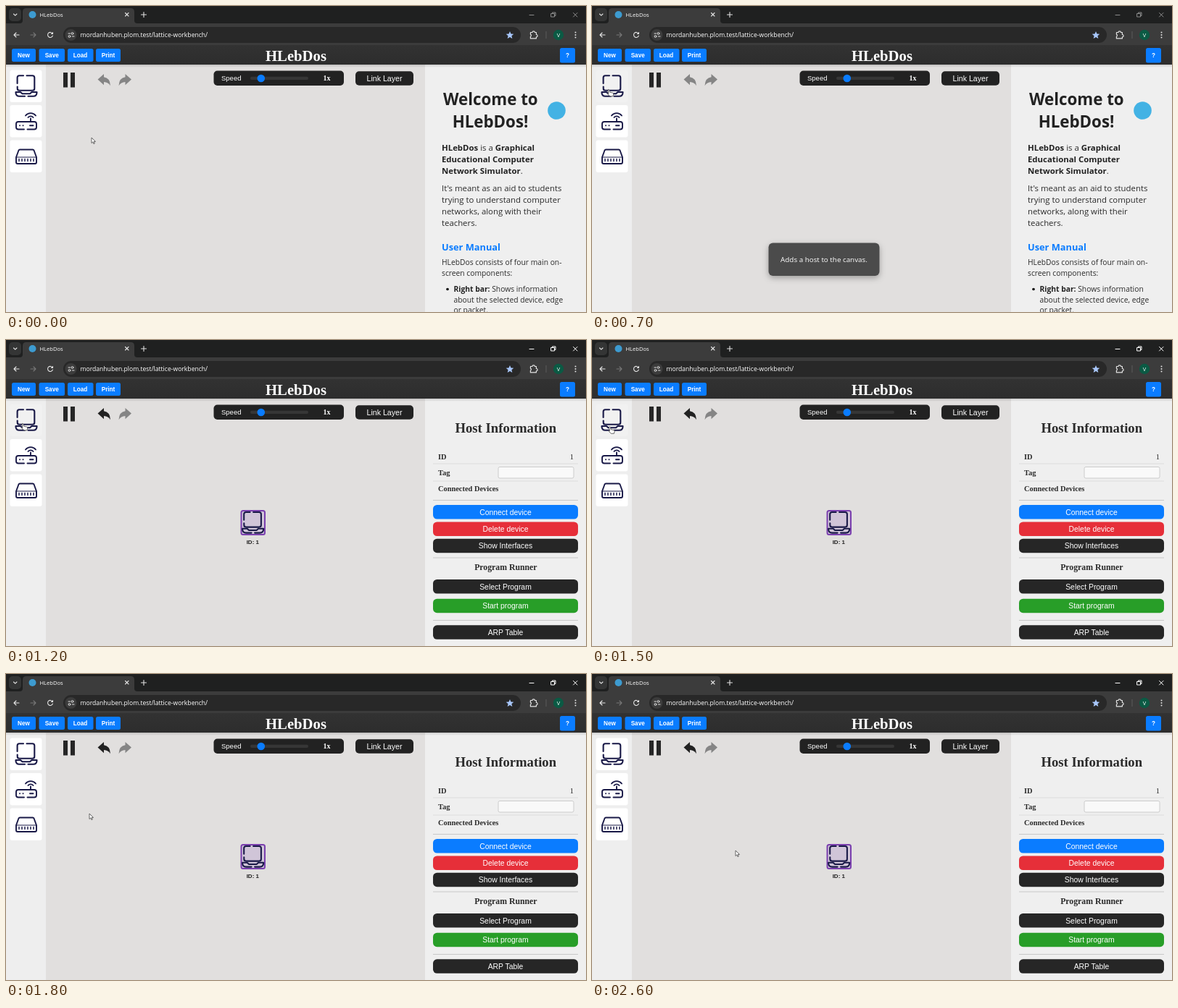
Animation of 800 by 423 pixels, one loop 2700 ms. Source, as an HTML page:

```html
<!DOCTYPE html>
<html lang="en">
<head>
<meta charset="utf-8">
<title>Network classroom</title>
<style>
html, body { margin: 0; width: 100%; height: 100%; overflow: hidden; background: #e1dfde; }
svg { display: block; width: 800px; height: 423px; }
text { font-family: "Open Sans", "Noto Sans", sans-serif; fill: #2b2b2b; }
.arial text, text.arial { font-family: "Liberation Sans", Arial, sans-serif; }
.serif text { font-family: "Liberation Serif", "Times New Roman", serif; font-weight: bold; }
.mid, .mid text { text-anchor: middle; }
text.white, .white text { fill: #fff; }
.b { font-weight: bold; fill: #222; }
.line { fill: none; stroke-linecap: round; stroke-linejoin: round; }
.blue { fill: #0a7cff; }
.dark { fill: #262626; }
</style>
</head>
<body>
<svg viewBox="0 0 800 423">
<defs>
  <linearGradient id="bar" x2="0" y2="1"><stop stop-color="#323232"/><stop offset="1" stop-color="#2d2d2d"/></linearGradient>
  <linearGradient id="fade" x2="0" y2="1"><stop stop-opacity=".14"/><stop offset="1" stop-opacity="0"/></linearGradient>
  <filter id="soft" x="-20%" y="-40%" width="140%" height="200%"><feDropShadow dx="0" dy="3" stdDeviation="4" flood-opacity=".3"/></filter>
  <g id="laptop" class="line" stroke="#191947" stroke-width="2.1">
    <path d="M15.600 107V99q0-2.800 2.800-2.800H24M28.500 96.200h8q2.800 0 2.800 2.800v15q0 2.800-2.800 2.800h-18q-2.800 0-2.800-2.800v-2.500"/>
    <path d="M26 124.800h-7.500q-5 0-5-5v-.800H20l2.500 2.200h10.500l2.500-2.200h7v.800q0 5-5 5h-7"/>
  </g>
  <path id="bend" d="M126.500 101.500L135 94v4.300q8.500 1 9 12q-3-5-9-5.300v4.300z"/>
</defs>

<!-- browser frame -->
<rect width="800" height="26" fill="#1f2020"/>
<rect y="24" width="800" height="30" fill="#3c3c3c"/>
<path d="M19 24q4 0 4-4V8q0-5 5-5h144q5 0 5 5v12q0 4 4 4z" fill="#3c3c3c"/>
<rect x="4" y="3" width="17" height="18" rx="5" fill="#343535"/>
<circle cx="36.500" cy="12" r="5" fill="#3d9bd0"/>
<text class="white" x="46.500" y="15" font-size="7.600">HLebDos</text>
<g class="line" stroke="#e3e3e3" stroke-width="1.100">
  <path d="M10.500 11l2.200 2.200l2.200-2.200M164.500 9.500l4.500 4.500m0-4.500l-4.500 4.500M186.500 12h7m-3.500-3.500v7"/>
  <path d="M18 40h-7m3-3l-3 3l3 3M64 38a3.500 3.500 0 1 0 .400 3M64.500 36.500v2h-2"/>
  <path d="M34 40h7m-3-3l3 3l-3 3" stroke="#777"/>
</g>
<rect x="79" y="29" width="631" height="22" rx="11" fill="#282828"/>
<circle cx="89.500" cy="40" r="8" fill="#3c3c3c"/>
<g class="line" stroke="#e3e3e3">
  <path d="M86 38h2.500M91.500 42H94"/>
  <circle cx="91.500" cy="38" r="1.400"/><circle cx="87.500" cy="42" r="1.400"/>
  <path d="M723.500 36.500h2.500a1.700 1.700 0 0 1 3.400 0h2v3a1.700 1.700 0 0 1 0 3.400v2h-8v-2.500q2-1.700 0-3.400z" stroke-width="1.200"/>
</g>
<text class="white" x="102.500" y="43" font-size="8.600">mordanhuben.plom.test/lattice-workbench/</text>
<path d="M695 35l1.500 3.500l3.800.300l-2.900 2.500l.900 3.700l-3.300-2l-3.300 2l.900-3.700l-2.900-2.500l3.800-.300z" fill="#a8c7fa"/>
<path d="M745 35v10" stroke="#5b5b5b"/>
<circle cx="762" cy="40" r="7.200" fill="#0b5a44"/>
<text class="white mid" x="762" y="42.800" font-size="7.500">V</text>
<g fill="#e3e3e3"><circle cx="785.500" cy="36.500" r="1"/><circle cx="785.500" cy="40" r="1"/><circle cx="785.500" cy="43.500" r="1"/></g>
<path id="controls" class="line" d="M722 12.500h6M752 10.500h4.500v4.500H752zM753.500 10.500V9h4.500v4.500h-1.500M782.500 9.500l5.500 5.500m0-5.500l-5.500 5.500"/>

<!-- page -->
<rect y="81" width="55" height="342" fill="#eee"/>
<rect x="578" y="81" width="222" height="342" fill="#efefef"/>
<rect y="81" width="800" height="4" fill="url(#fade)"/>
<rect y="54" width="800" height="27" fill="url(#bar)"/>
<g class="serif"><text class="white mid" x="400" y="75.500" font-size="20.700">HLebDos</text></g>
<g class="arial mid white" font-size="8.200" font-weight="bold">
  <g class="blue">
    <rect x="8" y="59" width="33" height="18" rx="2.500"/><rect x="45.500" y="59" width="35.500" height="18" rx="2.500"/>
    <rect x="85" y="59" width="35.500" height="18" rx="2.500"/><rect x="124" y="59" width="34" height="18" rx="2.500"/>
    <rect x="764" y="58" width="21" height="20.500" rx="2.500"/>
  </g>
  <text x="24.500" y="71">New</text><text x="63.200" y="71">Save</text>
  <text x="102.500" y="71">Load</text><text x="141" y="71">Print</text>
  <text x="774.500" y="71.300">?</text>
</g>

<!-- device palette -->
<g fill="#fff">
  <rect id="card" x="5.500" y="88.500" width="44" height="44.500" rx="3"/>
  <rect x="5.500" y="137" width="44" height="44.500" rx="3"/>
  <rect x="5.500" y="185.500" width="44" height="44.500" rx="3"/>
</g>
<use href="#laptop"/>
<g class="line" stroke="#191947" stroke-width="1.900">
  <path d="M25 170.500h-8q-3 0-3-3V163q0-3 3-3h22q3 0 3 3v4.500q0 3-3 3h-9.500M34 155.500v4M19 165.300h.100M23.500 165.300h.100M33 165.300h4.500"/>
  <path d="M30.500 154a4.600 4.600 0 0 1 7 0M27 151.500a9 9 0 0 1 14 0"/>
  <path d="M14 209l3.500-9.500q.500-1 1.500-1h18q1 0 1.500 1L42 209v7q0 2-2 2H16q-2 0-2-2z"/>
  <path d="M14.500 209h27" stroke-width="1.200"/>
  <path d="M18 211.500v3m4-3v3m4-3v3m4-3v3m4-3v3m4-3v3" stroke-width="1.500"/>
</g>

<!-- canvas controls -->
<path d="M79 92h6v20.500h-6zM89 92h6v20.500h-6z" class="dark"/>
<use id="undo" href="#bend"/>
<use href="#bend" transform="matrix(-1 0 0 1 299.500 0)" fill="#858585"/>
<rect x="286.500" y="89.500" width="179.500" height="20.500" rx="5" fill="#222"/>
<rect x="482" y="90.300" width="80" height="19.500" rx="5" fill="#222"/>
<rect x="337" y="97.800" width="80" height="4.200" rx="2" fill="#363636"/>
<circle cx="351.800" cy="100" r="5.300" class="blue"/>
<g class="arial white">
  <text x="297" y="103" font-size="9.500">Speed</text>
  <text x="522" y="103.800" font-size="10.600" class="mid">Link Layer</text>
</g>
<g class="serif"><text class="white" x="437.500" y="103.300" font-size="10">1x</text></g>

<g id="toast">
  <rect x="243.500" y="327.500" width="153" height="45.500" rx="6" fill="#4c4c4c" filter="url(#soft)"/>
  <text class="white mid" x="320" y="354" font-size="9.860">Adds a host to the canvas.</text>
</g>

<g id="welcome">
  <g class="mid" font-size="22.300"><text class="b" x="668.300" y="137">Welcome to</text><text class="b" x="668" y="167.500">HLebDos!</text></g>
  <circle cx="759.500" cy="144.500" r="12.300" fill="#43b2e4"/>
  <g font-size="11.380">
    <text x="601" y="200"><tspan class="b">HLebDos</tspan> is a <tspan class="b">Graphical</tspan></text>
    <text class="b" x="601" y="216">Educational Computer</text>
    <text x="601" y="232"><tspan class="b">Network Simulator</tspan>.</text>
    <text x="601" y="256">It's meant as an aid to students</text>
    <text x="601" y="272">trying to understand computer</text>
    <text x="601" y="288">networks, along with their</text>
    <text x="601" y="303.500">teachers.</text>
  </g>
  <text x="601" y="337.500" font-size="12.800" font-weight="bold" style="fill:#0a7cff">User Manual</text>
  <g font-size="10.300">
    <text x="601" y="358">HLebDos consists of four main on-</text>
    <text x="601" y="373">screen components:</text>
    <circle cx="609" cy="391.500" r="1.800"/>
    <text x="617.500" y="395"><tspan class="b">Right bar:</tspan> Shows information</text>
    <text x="617.500" y="409.500">about the selected device, edge</text>
    <text x="617.500" y="424">or packet.</text>
  </g>
</g>

<g id="host">
  <rect x="324.500" y="236" width="32.500" height="33" rx="2.500" fill="#d0c5d8" stroke="#7a3fae" stroke-width="2"/>
  <use href="#laptop" x="312.600" y="141.800"/>
  <text class="arial mid b" x="340.300" y="281.500" font-size="8">ID: 1</text>
  <g class="serif" font-size="10.400">
    <text class="mid" x="689.300" y="128" font-size="18.700">Host Information</text>
    <text x="596" y="164.500">ID</text><text x="596" y="187">Tag</text><text x="596" y="209">Connected Devices</text>
    <text x="783" y="164.500" text-anchor="end" style="font-weight:400">1</text>
    <text class="mid" x="689.300" y="318" font-size="11.750">Program Runner</text>
  </g>
  <path d="M589 171h200M589 195h200" stroke="#ddd"/>
  <path d="M589 221.500h200M589 301h200M589 387.500h200" stroke="#c8c8c8"/>
  <rect x="679" y="175.500" width="104" height="15.500" rx="2" fill="#f9f9f9" stroke="#ccc"/>
  <g id="buttons" class="arial mid white" font-size="10.400"></g>
</g>

<g id="cursor" stroke="#444" stroke-width=".8" stroke-linejoin="round" fill="#fff">
  <path id="arrow" d="M0 0v7.500l1.800-1.600l1.200 2.700l1.300-.600l-1.200-2.600h2.400z"/>
  <path id="busy" d="M5.500 5.500h2M5.500 8.500h2" stroke="#555" stroke-width="1.300"/>
  <path id="hand" d="M0 .800q1-1.200 1.700.200l.900 3.200l4 .900q1.300.500 1 2l-.700 2.700h-4L-.700 6.500q.300-1.200 1.700-.200z"/>
</g>
</svg>
<script>
const $ = id => document.getElementById(id);
const show = (id, on) => $(id).style.display = on ? "" : "none";
const LOOP = 2700, STEP = 100, HOVER = 500, FOCUS = 800, ADD = 1200, LEAVE = 1600;

$("buttons").innerHTML = [
  ["Connect device", 228, "#0a7cff"], ["Delete device", 251.5, "#e62f39"],
  ["Show Interfaces", 274.7, "#262626"], ["Select Program", 331, "#262626"],
  ["Start program", 357.7, "#289e28"], ["ARP Table", 394.3, "#262626"]
].map(([label, y, fill]) =>
  `<rect x="589" y="${y}" width="200" height="19.500" rx="5.500" fill="${fill}"/>
   <text x="689" y="${y + 13.5}">${label}</text>`).join("");

// time, x, y of the pointer tip
const path = [[0, 118, 182], [400, 33, 127], [600, 22, 115], [1200, 22, 115],
  [1500, 23.5, 119.5], [1800, 115, 193], [2600, 198, 244]];

function pointer(t) {
  const i = Math.max(1, path.findIndex(p => p[0] >= t));
  const [a, b] = [path[i - 1], path[i]];
  const u = (t - a[0]) / (b[0] - a[0]), k = u * u * (3 - 2 * u);
  return [1, 2].map(n => a[n] + (b[n] - a[n]) * k);
}

function draw(now) {
  const t = Math.floor(now % LOOP / STEP) * STEP;
  const hover = t >= HOVER && t < LEAVE, added = t >= ADD;
  show("welcome", !added);
  show("host", added);
  show("toast", hover && !added);
  show("hand", hover);
  show("arrow", !hover);
  show("busy", t === 400);
  $("card").setAttribute("fill", hover ? "#f1f1f1" : "#fff");
  $("undo").setAttribute("fill", added ? "#222" : "#858585");
  $("controls").setAttribute("stroke", t >= FOCUS ? "#fff" : "#8c8c8c");
  $("cursor").setAttribute("transform", `translate(${pointer(t)})`);
}

let start;
function tick(now) {
  start ??= now;
  draw(now - start);
  requestAnimationFrame(tick);
}
draw(0);
requestAnimationFrame(tick);
</script>
</body>
</html>
```
